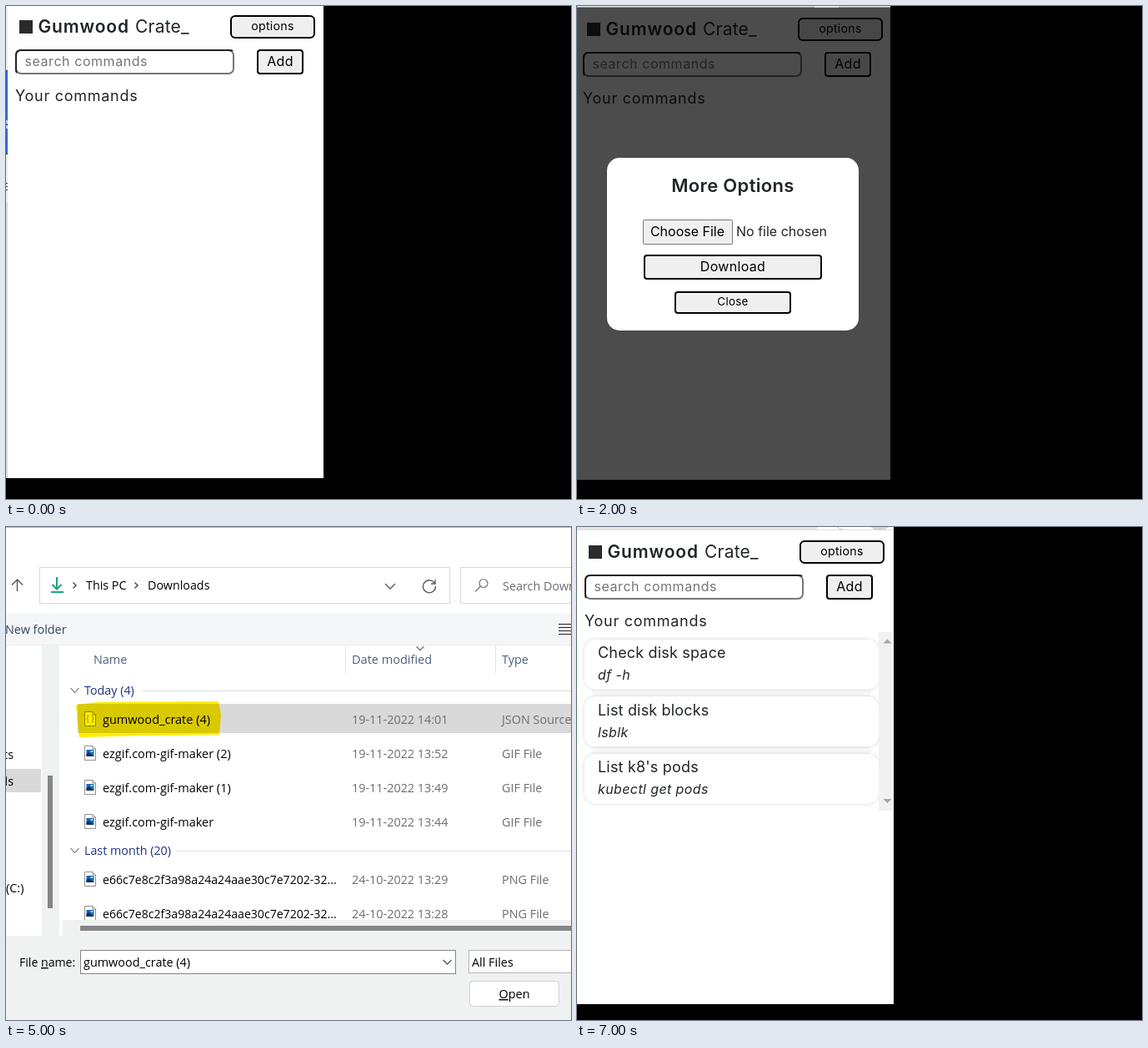
Animation, 678 px wide and 591 px high, one loop 8 s. Source, as an HTML page:

```html
<!DOCTYPE html>
<html lang="en">
<head>
<meta charset="utf-8">
<title>Import commands</title>
<style>
  html, body { margin: 0; width: 100%; height: 100%; overflow: hidden; background: #000; }
  svg { display: block; width: 678px; height: 591px; }
  text { white-space: pre; }
  .ui { font-family: Inter, sans-serif; }
  .win { font-family: "Open Sans", "Noto Sans", sans-serif; }
  .marker { fill: #ffec00; mix-blend-mode: multiply; }
</style>
</head>
<body>
<svg id="stage" viewBox="0 0 678 591">
  <defs>
    <filter id="soft" x="-10%" y="-30%" width="120%" height="160%">
      <feDropShadow dx="0" dy="0" stdDeviation="2.4" flood-color="#000" flood-opacity=".17"/>
    </filter>
  </defs>
</svg>
<script>
const stage = document.getElementById('stage');
const STEP = 1000, STEPS = 8;

// Shape helpers: all take outer pixel edges
const box = (x, y, w, h, fill, more = '') =>
  `<rect x="${x}" y="${y}" width="${w}" height="${h}" fill="${fill}" ${more}/>`;
const framed = (x, y, w, h, fill, stroke, sw = 1, r = 0) =>
  box(x + sw / 2, y + sw / 2, w - sw, h - sw, fill, `rx="${r}" stroke="${stroke}" stroke-width="${sw}"`);
const line = (d, color, w = 1, more = '') =>
  `<path d="${d}" fill="none" stroke="${color}" stroke-width="${w}" ${more}/>`;
const text = (x, y, size, str, fill = '#000', more = '') =>
  `<text x="${x}" y="${y}" font-size="${size}" fill="${fill}" ${more}>${str}</text>`;
const spaced = em => `letter-spacing="${em}em"`;
const mid = 'text-anchor="middle"';
const group = (dx, dy, body) => `<g transform="translate(${dx} ${dy})">${body}</g>`;
const marker = points => `<polygon class="marker" points="${points}"/>`;

const button = (x, y, w, h, base, size, label, r = 3) =>
  framed(x, y, w, h, '#efefef', '#000', 2, r) +
  text(x + w / 2, y + base, size, label, '#000', `${mid} ${spaced(.02)}`);

// Extension popup
function header() {
  const ink = '#212529';
  return box(16, 17, 16, 16, '#2b2b2b') +
    text(38.5, 32, 21, 'Gumwood', ink, `font-weight="600" ${spaced(.04)}`) +
    text(155, 32, 21, 'Crate_', ink, spaced(.01)) +
    button(269, 11, 102, 28, 18, 14.2, 'options', 5) +
    framed(11, 52, 263, 30, '#fff', '#767676', 2, 6) +
    line('M13 80Q12 79 12 76V59Q12 53 18 53H267Q271 53 272 54', '#222', 2) +
    text(22.5, 72, 16, 'search commands', '#757575', spaced(.035)) +
    button(301, 52, 56, 30, 20, 16, 'Add') +
    text(11, 114, 18, 'Your commands', ink, spaced(.04));
}

function popup() {
  return box(2, 0, 379, 566, '#fff') +
    box(0, 0, 2, 566, '#d9d9d9') + box(0, 0, 2, 77, '#ececec') + box(0, 178, 2, 58, '#ececec') +
    box(0, 77, 2, 101, '#3166c8') + box(0, 77, 2, 1, '#1c3c78') + box(0, 177, 2, 1, '#1c3c78') +
    box(0, 137, 2, 4, '#b9cbee') + box(0, 143, 2, 4, '#b9cbee') +
    line('M0 212.5H2M0 216.5H2M0 220.5H2', '#444') +
    header();
}

function modal() {
  return box(0, 0, 376, 568, '#fff') + group(-4, 3, header()) +
    box(0, 0, 376, 568, '#000', 'opacity=".7"') +
    box(0, 0, 376, 1.5, '#e6e6e6') + box(285, 0, 29, 1.5, '#fff') +
    box(36, 182, 302, 207, '#fff', 'rx="15"') +
    text(187, 223, 22, 'More Options', '#212529', `${mid} font-weight="600" ${spaced(.015)}`) +
    framed(79, 256, 108, 30, '#efefef', '#767676', 1, 1) +
    text(132.5, 276, 16, 'Choose File', '#000', mid) +
    text(191, 276, 16, 'No file chosen', '#212529') +
    button(80, 298, 214, 30, 20, 16, 'Download') +
    button(117, 342, 140, 27, 17, 13.4, 'Close');
}

function filled() {
  const items = [['Check disk space', 'df -h'], ['List disk blocks', 'lsblk'], ["List k8's pods", 'kubectl get pods']];
  const cards = items.map(([name, cmd], i) => {
    const y = 135 + i * 68.5;
    return box(9, y, 353, 59.5, '#fff', 'rx="14" filter="url(#soft)"') +
      text(25, y + 22, 18, name, '#212529', spaced(.01)) +
      text(25, y + 48, 16, cmd, '#212529', `font-style="italic" ${spaced(.025)}`);
  });
  return box(0, 0, 380, 572, '#fff') +
    box(0, 0, 288, 3, '#e4e4e4') + box(0, 3, 380, 1, '#e2e2e2') +
    line('M312 0Q314 3 320 3', '#ccc') + '<path d="M353 0H374Q370 4 363 4T353 0" fill="#d2d2d2"/>' +
    group(-2, 5, header()) +
    box(18, 194, 334, 9, '#f9f9f9') + box(18, 263, 334, 9, '#f9f9f9') +
    cards.join('') +
    box(362, 126, 17, 214, '#f1f1f1') +
    '<path d="M367.5 139.5L372.5 134.5L377.5 139.5ZM367.5 326L372.5 331L377.5 326Z" fill="#a3a3a3"/>';
}

// File chooser
const pageIcon = (y, json) =>
  `<path d="M94.5 ${y - 8.5}H104L107.5 ${y - 5}V${y + 8.5}H94.5Z" fill="#fff" stroke="#8f8f8f"/>` +
  line(`M104 ${y - 8.5}V${y - 5}H107.5`, '#8f8f8f') +
  (json
    ? line(`M99.5 ${y - 4}H98V${y - 1}L97 ${y}L98 ${y + 1}V${y + 4}H99.5M102.5 ${y - 4}H104V${y - 1}L105 ${y}L104 ${y + 1}V${y + 4}H102.5`, '#b5b52a', 1.2)
    : box(96.5, y - 4, 9, 8, '#1668b8') + `<path d="M96.5 ${y + 4}V${y + 1}L99 ${y - 1}L105.5 ${y + 4}Z" fill="#0b2f57"/>` +
      box(101.5, y - 3, 3, 2, '#8fd0f5'));

function fileRow(y, name, date, type, size = 14.5) {
  const gray = '#6d6d6d';
  return pageIcon(y - 1, type[0] === 'J') + text(116, y + 5, size, name) +
    text(415, y + 5, 14.4, date, gray) + text(595, y + 5, 14.4, type, gray);
}

const section = (y, label, from) =>
  line(`M77.5 ${y - 3}L82.5 ${y + 2.5}L87.5 ${y - 3}`, '#666', 1.1) +
  text(94, y + 5, 14.3, label, '#1e3287') + box(from, y, 678 - from, 1, '#e0e0e0');

function chooser() {
  const head = '#4c607a', hash = 'e66c7e8c2f3a98a24a24aae30c7e7202-32...';
  const under = c => `<tspan text-decoration="underline">${c}</tspan>`;
  const chevron = (x, y, r, color) => line(`M${x - r} ${y - r / 2}L${x} ${y + r / 2}L${x + r} ${y - r / 2}`, color, 1.3);
  const crumb = x => line(`M${x - 1.5} 66.5L${x + 2} 70L${x - 1.5} 73.5`, '#444', 1.4);
  const burger = [0, 1, 2, 3].map(i => box(663, 116 + i * 4, 15, 1, '#222')).join('');

  return box(0, 0, 678, 591, '#fff') + box(0, 0, 678, 1, '#b4b4b4') +
    // address bar
    line('M13.5 77V63M7 69.5L13.5 63L20 69.5', '#555', 1.4) +
    framed(40, 48, 493, 44, '#fff', '#d9d9d9') + framed(545, 48, 140, 44, '#fff', '#d9d9d9') +
    line('M61 60V74M55.5 69L61 74.5L66.5 69', '#16a67e', 2) + box(54, 77, 15, 2, '#16a67e') +
    crumb(82) + crumb(156) +
    text(96, 75, 14.3, 'This PC') + text(170, 75, 14.3, 'Downloads') +
    chevron(461, 71, 6, '#555') +
    line('M514.5 67.5A7.5 7.5 0 1 0 515.5 71M515 63V68H510', '#555', 1.3) +
    '<circle cx="573" cy="67.5" r="5" fill="none" stroke="#777" stroke-width="1.2"/>' +
    line('M569.5 71L563 77.5', '#777', 1.3) +
    text(596, 76, 14.4, 'Search Downloads', '#6d6d6d') +
    // toolbar and columns
    box(0, 103, 678, 38, '#f5f6f8') + box(0, 141, 678, 1, '#ebecee') +
    text(-1, 128, 14.4, 'New folder', '#33475f') + burger +
    box(43, 142, 21, 348, '#f0f1f1') +
    box(407, 142, 1, 33, '#e3e3e3') + box(587, 142, 1, 33, '#e3e3e3') +
    chevron(497, 145.5, 4.5, '#777') +
    text(105, 164, 14.4, 'Name', head) + text(415, 164, 14.5, 'Date modified', head) + text(595, 164, 14.4, 'Type', head) +
    // side pane
    box(0, 290, 42, 28, '#d9d9d9') +
    text(9, 278, 14.4, 'ts', '#000', 'text-anchor="end"') + text(9, 310, 14.4, 'ds', '#000', 'text-anchor="end"') +
    text(0, 438, 14.4, '(C:)') + box(50, 298, 6, 159, '#858585') +
    // listing
    section(196, 'Today (4)', 163) + box(86, 212, 592, 35, '#d9d9d9') +
    fileRow(231, 'gumwood_crate (4)', '19-11-2022 14:01', 'JSON Source File') +
    fileRow(272, 'ezgif.com-gif-maker (2)', '19-11-2022 13:52', 'GIF File') +
    fileRow(313, 'ezgif.com-gif-maker (1)', '19-11-2022 13:49', 'GIF File') +
    fileRow(354, 'ezgif.com-gif-maker', '19-11-2022 13:44', 'GIF File') +
    section(388, 'Last month (20)', 205) +
    fileRow(423, hash, '24-10-2022 13:29', 'PNG File', 14.1) +
    fileRow(464, hash, '24-10-2022 13:28', 'PNG File', 14.1) +
    box(68, 471, 610, 20, '#f0f1f1') + box(89, 478, 589, 6, '#858585') +
    // footer
    box(0, 490, 678, 101, '#f0f2f2') +
    text(16, 527, 14.1, `File ${under('n')}ame:`) +
    framed(89, 507, 451, 29, '#fff', '#858585') + text(93, 527, 14.4, 'gumwood_crate (4)') +
    chevron(529.5, 521.5, 5, '#555') +
    framed(555, 507, 140, 28, '#fff', '#b5b5b5') + text(559, 527, 14.4, 'All Files') +
    framed(556, 544, 108, 31, '#fff', '#cfcfcf', 1, 4) +
    text(610, 565, 14.4, `${under('O')}pen`, '#000', mid);
}

const scenes = [];
function scene(cls, body, ...steps) {
  const g = document.createElementNS('http://www.w3.org/2000/svg', 'g');
  g.setAttribute('class', cls);
  g.innerHTML = body;
  stage.append(g);
  scenes.push({ g, steps });
}

scene('ui', popup(), 0, 1);
scene('ui', modal(), 2, 3);
scene('win', chooser(), 4, 5, 6);
scene('ui', filled(), 7);
scene('', marker('263,8 290,5 374,5 375,20 373,43 330,44 266,45 265,30'), 1);
scene('', marker('67,251 78,249 92,249 112,246 186,246 192,248 190,263 192,289 140,290 92,292 87,289 70,289 72,263 68,261'), 3);
scene('', marker('84,213 110,210 255,209 258,225 256,249 170,250 88,252 86,235'), 5);
scene('', marker('551,544 558,545 580,543 650,541 665,542 667,556 665,577 630,579 590,580 556,582 553,570 554,556'), 6);

function draw(ms) {
  const step = Math.floor(ms / STEP) % STEPS;
  for (const { g, steps } of scenes) g.style.display = steps.includes(step) ? '' : 'none';
}

let start;
function tick(now) {
  start ??= now;
  draw(now - start);
  requestAnimationFrame(tick);
}
draw(0);
requestAnimationFrame(tick);
</script>
</body>
</html>
```
